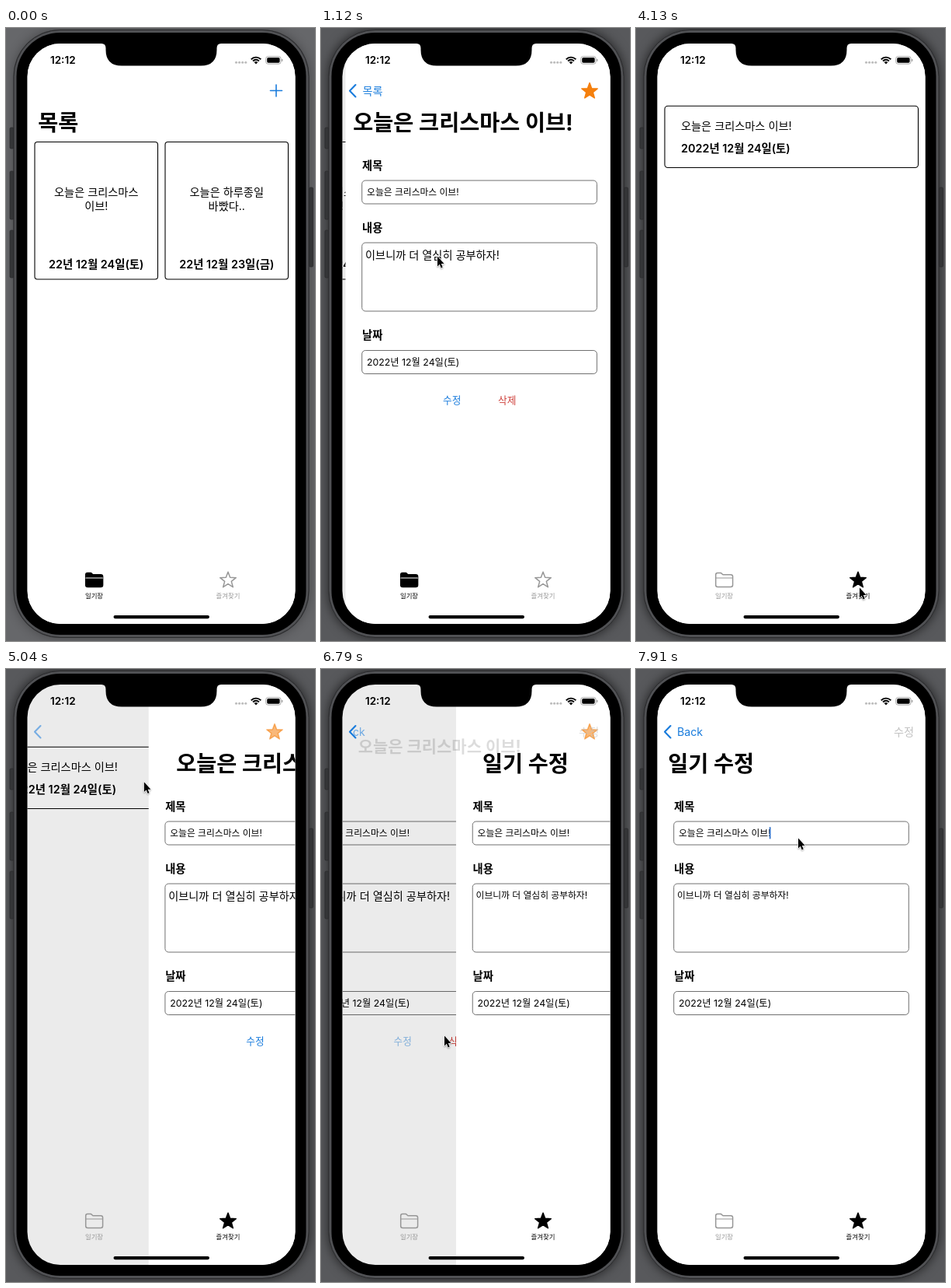
Write an HTML page with a canvas that moves like this. It is 398 by 788 pixels and loops after 8 s.

```html
<!DOCTYPE html>
<html lang="ko">
<head>
<meta charset="utf-8">
<style>
html, body { margin: 0; width: 100%; height: 100%; overflow: hidden; background: #4c4d50; }
canvas { display: block; width: 398px; height: 788px; }
</style>
</head>
<body>
<canvas id="stage"></canvas>
<script>
const LOOP = 8000, WIDTH = 345;
const BLUE = '#187bdc', RED = '#cf423d', ORANGE = '#f57f0c', GRAY = '#979797';
const canvas = document.getElementById('stage');
const ctx = canvas.getContext('2d');
const dpr = window.devicePixelRatio || 1;
canvas.width = 398 * dpr;
canvas.height = 788 * dpr;
let now = 0;

function text(str, x, y, size, { weight = 400, color = '#000', align = 'left' } = {}) {
  ctx.font = `${weight} ${size}px Inter, "Noto Sans CJK KR", "Noto Sans CJK", sans-serif`;
  ctx.fillStyle = color;
  ctx.textAlign = align;
  ctx.fillText(str, x, y);
}

function box(x, y, w, h, r, fill, stroke, line = 1) {
  ctx.beginPath();
  ctx.roundRect(x, y, w, h, r);
  if (fill) { ctx.fillStyle = fill; ctx.fill(); }
  if (stroke) { ctx.strokeStyle = stroke; ctx.lineWidth = line; ctx.stroke(); }
}

function trace(d, stroke, line, fill) {
  const path = new Path2D(d);
  ctx.lineJoin = ctx.lineCap = 'round';
  if (fill) { ctx.fillStyle = fill; ctx.fill(path); }
  if (stroke) { ctx.strokeStyle = stroke; ctx.lineWidth = line; ctx.stroke(path); }
}

function star(cx, cy, r, color, solid) {
  let d = '';
  for (let i = 0; i < 10; i++) {
    const a = i * Math.PI / 5 - Math.PI / 2, k = i % 2 ? r * 0.42 : r;
    d += (i ? 'L' : 'M') + (cx + k * Math.cos(a)) + ' ' + (cy + k * Math.sin(a));
  }
  trace(d + 'Z', color, 1.5, solid && color);
}

// Runs a drawing step with its own alpha and shift.
function layer(alpha, dx, draw) {
  if (alpha <= 0) return;
  ctx.save();
  ctx.globalAlpha *= Math.min(1, alpha);
  ctx.translate(dx, 0);
  draw();
  ctx.restore();
}

const TITLE = '오늘은 크리스마스 이브!';
const MEMO = '이브니까 더 열심히 공부하자!';
const DATE = '2022년 12월 24일(토)';
const HEADING = 28.3;

function card(x, lines, date) {
  const mid = x + 79.25;
  box(x, 146.5, 158.5, 176.5, 3.5, null, '#000', 1.1);
  lines.forEach((s, i) => text(s, mid, 216 + 18 * i, 14.2, { align: 'center' }));
  text(date, mid, 308.5, 14.4, { weight: 600, align: 'center' });
}

function form(memoSize, memoY) {
  [['제목', 182], ['내용', 262], ['날짜', 400]].forEach(([s, y]) => text(s, 49, y, 14.3, { weight: 600 }));
  [[196, 30], [276, 88], [414.5, 30]].forEach(([y, h]) => box(48.7, y, 302.6, h, 4.5, null, '#707070'));
  text(TITLE, 55, 215.3, 11.8);
  text(MEMO, 53, memoY, memoSize);
  text(DATE, 55, 433.8, 12.3);
}

const detail = back => ({
  title: TITLE, back,
  right: () => star(346, 81.3, 10.7, ORANGE, true),
  body() {
    form(14.2, 296.8);
    layer(now > 6580 ? 0.5 : 1, 0, () => text('수정', 153, 483.1, 12.7, { color: BLUE }));
    text('삭제', 224, 483.1, 12.7, { color: RED });
  }
});

const list = {
  title: '목록',
  right: () => trace('M340.5 80.5H355.5M348 73V88', BLUE, 1.6),
  body() {
    card(37, ['오늘은 크리스마스', '이브!'], '22년 12월 24일(토)');
    card(205, ['오늘은 하루종일', '바빴다..'], '22년 12월 23일(금)');
  }
};

const favorites = {
  body() {
    box(37, 100.2, 326.5, 79.3, 4, null, '#000', 1.1);
    text(TITLE, 58, 131, 14.2);
    text(DATE, 58, 159.5, 14.4, { weight: 600 });
  }
};

const edit = {
  title: '일기 수정', back: 'Back',
  right: () => text('수정', 332, 85.8, 14.2, { color: '#c2c2c2' }),
  body() {
    form(11.8, 295);
    if (now > 7550) box(171.8, 203, 1.7, 15.5, 0.8, '#2d6fc9');
  }
};

const TAB_SWITCH = 3640;
const scenes = [
  { at: 0, page: list },
  { at: 660, page: detail('목록'), push: true },
  { at: TAB_SWITCH, page: favorites },
  { at: 4910, page: detail('Back'), push: true },
  { at: 6653, page: edit, push: true }
];

function navBar(page, old, p, rem) {
  if (old) {
    layer(1 - 1.5 * p, 0, () => {
      if (!old.title) return;
      ctx.translate(41.3 + 11 * p, 131.5 - 43 * p);
      ctx.scale(1 - 0.45 * p, 1 - 0.45 * p);
      text(old.title, 0, 0, HEADING, { weight: 700 });
    });
    if (old.right) layer(rem * 1.3, 0, old.right);
    if (old.back) layer(rem * 1.4, 0, () => {
      ctx.beginPath();
      ctx.rect(40, 60, 100, 40);
      ctx.clip();
      text(old.back, 53 - 51 * p, 85.8, 14.2, { color: BLUE });
    });
  }
  if (page.title) text(page.title, 41.3 + WIDTH * 1.17 * Math.max(0, rem - 0.012), 131.5, HEADING, { weight: 700 });
  if (page.right) layer(p, 0, page.right);
  if (page.back) {
    layer(old && old.back ? 1 : p, 0, () => trace('M44.5 73L37 80.7L44.5 88.4', BLUE, 2.1));
    layer(2.5 * p - 1.5, 40 * rem, () => text(page.back, 53, 85.8, 14.2, { color: BLUE }));
  }
}

function tabBar() {
  const fav = now >= TAB_SWITCH;
  const left = fav ? GRAY : '#000', right = fav ? '#000' : GRAY;
  trace('M102.7 705V703Q102.7 700.6 105 700.6H109.5L112 702.8H122Q124.6 702.8 124.6 705.2V716Q124.6 718.5 122 718.5H105.2Q102.7 718.5 102.7 716Z',
    left, 1.5, !fav && left);
  trace('M103 707H124.4', fav ? GRAY : '#fff', 1.2);
  star(286, 710, 10.8, right, fav);
  text('일기장', 113.5, 732.7, 8.4, { weight: 500, color: left, align: 'center' });
  text('즐겨찾기', 286, 732.7, 8.4, { weight: 500, color: right, align: 'center' });
  box(138.5, 755, 123.5, 4.2, 2.1, '#000');
}

function statusBar() {
  text('12:12', 57, 46.2, 13.5, { weight: 600 });
  for (let i = 0; i < 4; i++) box(295 + 4.1 * i, 42.8, 3, 3, 1.5, '#bcbcbc');
  trace('M322 46.5L319.6 44Q322 42 324.4 44Z', null, 0, '#000');
  ctx.lineCap = 'butt';
  ctx.strokeStyle = '#000';
  ctx.lineWidth = 1.9;
  [5.4, 8.6].forEach(r => {
    ctx.beginPath();
    ctx.arc(322, 46.2, r, -Math.PI * 0.76, -Math.PI * 0.24);
    ctx.stroke();
  });
  box(334.7, 36.6, 19.4, 9.6, 2.8, null, '#a0a0a0', 0.9);
  box(336.2, 38.1, 16.4, 6.6, 1.6, '#000');
  box(355.1, 39.8, 1.3, 3.2, 0.7, '#a0a0a0');
}

function phone() {
  const active = now >= 560;
  ctx.fillStyle = active ? '#58595c' : '#66676a';
  ctx.fillRect(0, 0, 398, 788);
  ctx.save();
  ctx.shadowColor = `rgba(0,0,0,${active ? 0.6 : 0.3})`;
  ctx.shadowBlur = 14 * dpr;
  box(9.5, 2, 381, 782, 60, '#3c3d3f');
  ctx.restore();
  [[5, 128, 27], [5, 184, 62], [5, 260, 61], [390.5, 205, 102]].forEach(([x, y, h]) =>
    box(x, y, 5, h, 1.5, '#343537', '#29292b', 0.7));
  box(10, 2.5, 380, 781, 60, '#505154', '#29292b');
  box(13.5, 6, 373, 774, 56, '#000');
}

const CURSOR = [
  [140, 402, 420], [560, 150, 293], [1120, 150, 293], [1750, 158, 288], [2080, 368, 57],
  [2380, 205, 233], [2590, 262, 560], [3080, 290, 742], [3220, 282, 740], [3640, 282, 740],
  [3920, 288, 719], [4130, 288, 719], [4760, 178, 142], [4970, 178, 142], [5670, 173, 236],
  [5750, 174, 262], [6080, 138, 380], [6420, 159, 471], [6790, 159, 471], [7420, 214, 228],
  [7550, 214, 228], [7910, 209, 217], [8000, 209, 217]
];

function cursor() {
  const i = CURSOR.findIndex(k => k[0] > now);
  if (i < 1) return;
  const [t0, x0, y0] = CURSOR[i - 1], [t1, x1, y1] = CURSOR[i];
  const u = (now - t0) / (t1 - t0), e = u * u * (3 - 2 * u);
  ctx.save();
  ctx.translate(x0 + (x1 - x0) * e, y0 + (y1 - y0) * e + 0.5);
  ctx.scale(0.88, 0.92);
  ctx.shadowColor = 'rgba(0,0,0,.35)';
  ctx.shadowBlur = 2 * dpr;
  ctx.shadowOffsetY = dpr;
  const d = 'M0 0V14L3.2 11.1L5.3 16.2L7.6 15.2L5.5 10.3H9.8Z';
  trace(d, '#fff', 1.6);
  ctx.shadowColor = 'transparent';
  trace(d, null, 0, '#000');
  ctx.restore();
}

function screen() {
  const i = scenes.findLastIndex(s => s.at <= now);
  const { at, page, push } = scenes[i];
  const wt = (now - at) * 0.014;
  const spring = push ? (1 + wt) * Math.exp(-wt) : 0;
  const rem = spring < 0.001 ? 0 : spring, p = 1 - rem;
  const old = rem ? scenes[i - 1].page : null;

  ctx.save();
  box(27.5, 20, WIDTH, 746, 42.5, '#fff');
  ctx.clip();
  if (old) {
    layer(1, -0.3 * WIDTH * p, old.body);
    ctx.fillStyle = `rgba(0,0,0,${0.08 * Math.min(1, 2 * p)})`;
    ctx.fillRect(27, 20, 347, 747);
  }
  layer(1, WIDTH * rem, () => {
    ctx.fillStyle = '#fff';
    ctx.fillRect(27.5, 20, 347, 747);
    page.body();
  });
  navBar(page, old, p, rem);
  tabBar();
  statusBar();
  trace('M123 19V20Q128.5 20 128.5 26V28Q128.5 48.5 149 48.5H251Q271.5 48.5 271.5 28V26Q271.5 20 277 20V19Z', null, 0, '#000');
  ctx.restore();
}

function frame(time) {
  now = time % LOOP;
  ctx.setTransform(dpr, 0, 0, dpr, 0, 0);
  phone();
  screen();
  cursor();
  requestAnimationFrame(frame);
}
requestAnimationFrame(frame);
</script>
</body>
</html>
```
